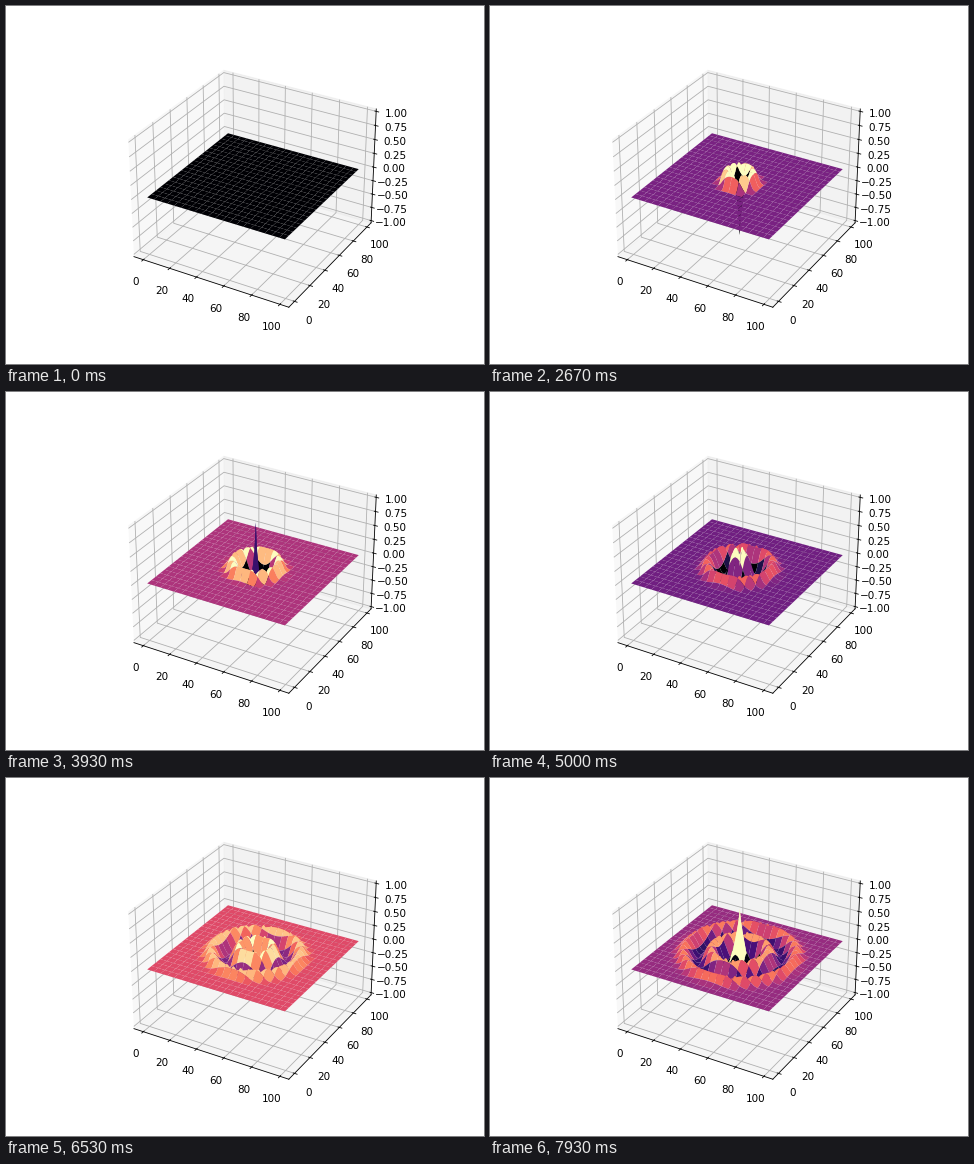
These frames come from a looping animation (478x358 px, 8 s). A matplotlib script:

```python
import numpy as np
import matplotlib.pyplot as plt
from matplotlib.animation import FuncAnimation

DPI = 74.6875
FRAMES, LOOP_MS = 120, 8000
SIZE, CENTRE, STRIDE = 100, 50, 5
SPEED = 0.35    # cells per step
OMEGA = 0.125   # radians per step


def simulate(steps):
    """Leapfrog wave equation driven by an oscillating point."""
    now = np.zeros((SIZE, SIZE))
    before = now.copy()
    history = [now]
    for k in range(1, steps):
        lap = (now[:-2, 1:-1] + now[2:, 1:-1] + now[1:-1, :-2]
               + now[1:-1, 2:] - 4 * now[1:-1, 1:-1])
        after = np.zeros_like(now)
        after[1:-1, 1:-1] = (2 * now - before)[1:-1, 1:-1] + SPEED**2 * lap
        after[CENTRE, CENTRE] = np.sin(OMEGA * k)
        before, now = now, after
        history.append(now)
    return history


def padded(lo, hi):
    pad = (hi - lo) / 48
    return lo - pad, hi + pad


heights = simulate(FRAMES)
X, Y = np.meshgrid(np.arange(SIZE), np.arange(SIZE))

# The tiny surplus guards against rounding down to one pixel less.
fig = plt.figure(figsize=(478.01 / DPI, 358.01 / DPI), dpi=DPI)
ax = fig.add_subplot(projection="3d")
margin = 0.05 * (SIZE - 1)
side = padded(-margin, SIZE - 1 + margin)
ax.set_xticks(range(0, 101, 20))
ax.set_yticks(range(0, 101, 20))
ax.set_zticks(np.linspace(-1, 1, 9))
ax.set(xlim=side, ylim=side, zlim=padded(-1, 1))
for name in "xyz":
    ax.tick_params(axis=name, pad=4)

surface = None


def draw(i):
    global surface
    if surface is not None:
        surface.remove()
    surface = ax.plot_surface(X, Y, heights[i], rstride=STRIDE,
                              cstride=STRIDE, cmap="magma")
    return [surface]


anim = FuncAnimation(fig, draw, frames=FRAMES, interval=LOOP_MS / FRAMES,
                     repeat=True, repeat_delay=0, blit=False)
plt.show()
```
